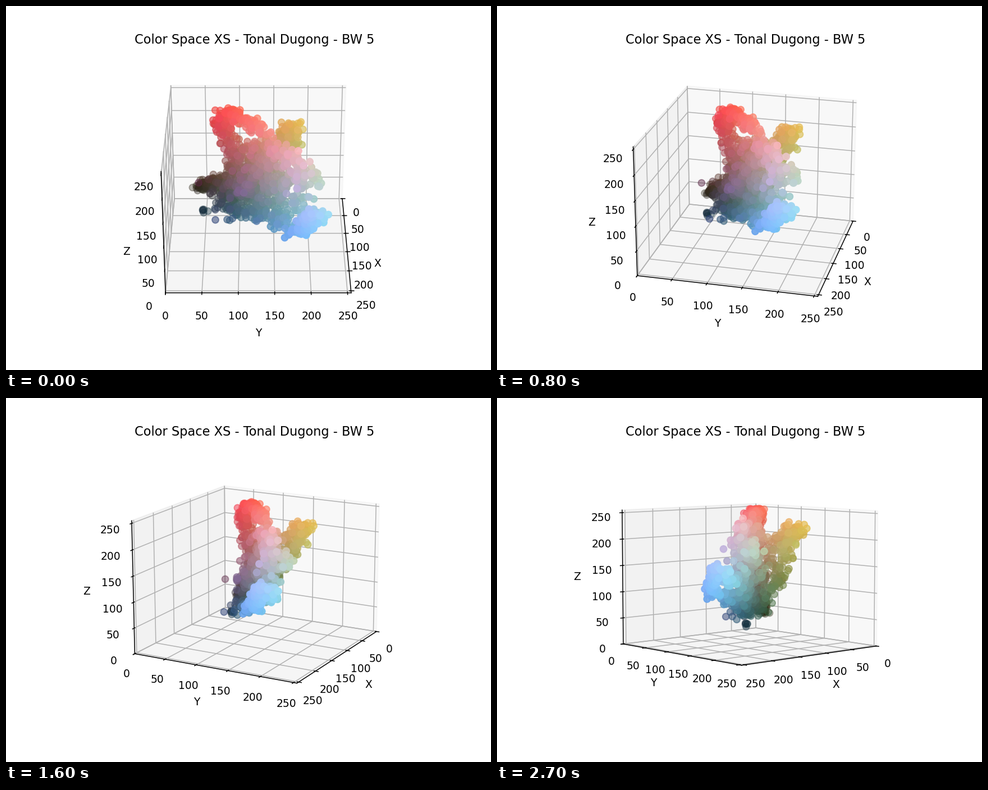
A matplotlib script that plays this animation: 864x648 px, repeating every 2.8 s.

```python
import matplotlib.pyplot as plt
import numpy as np
from matplotlib.animation import FuncAnimation
from matplotlib.colors import to_rgb

FRAMES = 28
INTERVAL = 100
START_ELEV, END_ELEV = 30, 5
START_AZIM, END_AZIM = 0.01, 50

# Strands of the cloud: colour stops, point count, brightness and hue jitter.
STRANDS = [
    ("#dc4b4b #ee504b #fa5a50", 110, 4, 7),            # red head
    ("#e14e4b #be5855 #965f5a #735c46", 115, 4, 6),    # red column
    ("#fa5f55 #fa7870 #eb8c87 #d29b9b", 80, 4, 6),     # salmon
    ("#af6e64 #cd8273 #cd968c", 75, 6, 8),             # dusky pink
    ("#e1969b #e4a8ac #d0b7be #beb9d2", 70, 5, 6),     # pink to lavender
    ("#645555 #967373 #be918f", 110, 8, 9),            # mauve core
    ("#3c3c37 #6e6e69 #96948c #c0beb4", 140, 6, 9),    # grey axis
    ("#3c4644 #5f787d #82a0aa #a0c3cd", 80, 6, 6),     # grey teal
    ("#5a5f5f #787a7d #969aa0 #b4b7c3", 60, 6, 7),     # cool grey
    ("#262310 #3c3424 #554835", 90, 4, 4),             # dark tail
    ("#554837 #826450 #b48c64 #d7aa5a", 90, 6, 6),     # brown to ochre
    ("#dcaa4b #d4b05a #bbae6a", 65, 5, 7),             # yellow head
    ("#b9aa5f #78783f #6e8755 #4b6950 #324b41", 100, 5, 6),  # olive green
    ("#37484b #3e5f6e #558296 #6ea5cd", 125, 5, 6),    # slate blue
    ("#6eaae6 #7dbaf7 #82befa #96c3f8", 70, 3, 5),     # sky blue head
    ("#98bcfc #aac8fc", 30, 2, 4),                     # periwinkle
    ("#4b6e6e #6ea0aa #8cc6dc #8ccdec #a5d2f5", 75, 4, 5),   # cyan
    ("#142e3c #162f3c", 6, 2, 2),
    ("#324d78 #375a82", 4, 3, 4),
    ("#6e6482 #8c708c", 22, 5, 6),                     # purple
    ("#c8c3b9 #b9cdc8", 16, 4, 5),                     # pale grey
]


def strand(rng, stops, count, light, hue):
    """Scatter points along the path that joins the colour stops."""
    path = np.array([to_rgb(s) for s in stops.split()]) * 255
    t = rng.uniform(0, len(path) - 1, count)
    knots = np.arange(len(path))
    points = np.column_stack([np.interp(t, knots, path[:, k]) for k in range(3)])
    points += rng.normal(0, light, (count, 1))
    points += np.clip(rng.normal(0, hue, (count, 3)), -2 * hue, 2 * hue)
    return np.clip(points, 4, 253)


rng = np.random.default_rng(5)
rgb = np.vstack([strand(rng, *s) for s in STRANDS])
red, green, blue = rgb.T

fig = plt.figure(figsize=(6.4, 4.8), dpi=135)
ax = fig.add_subplot(projection="3d")
ax.scatter(blue, green, red, c=rgb / 255, s=40)
ax.set(xlim=(0, 255), ylim=(0, 255), zlim=(0, 255),
       xlabel="X", ylabel="Y", zlabel="Z")
ax.set_title("Color Space XS - Tonal Dugong - BW 5")


def update(i):
    t = i / FRAMES
    ax.view_init(elev=START_ELEV + (END_ELEV - START_ELEV) * t,
                 azim=START_AZIM + (END_AZIM - START_AZIM) * t)
    return []


anim = FuncAnimation(fig, update, frames=FRAMES, init_func=lambda: update(0),
                     interval=INTERVAL, repeat=True)
plt.show()
```
